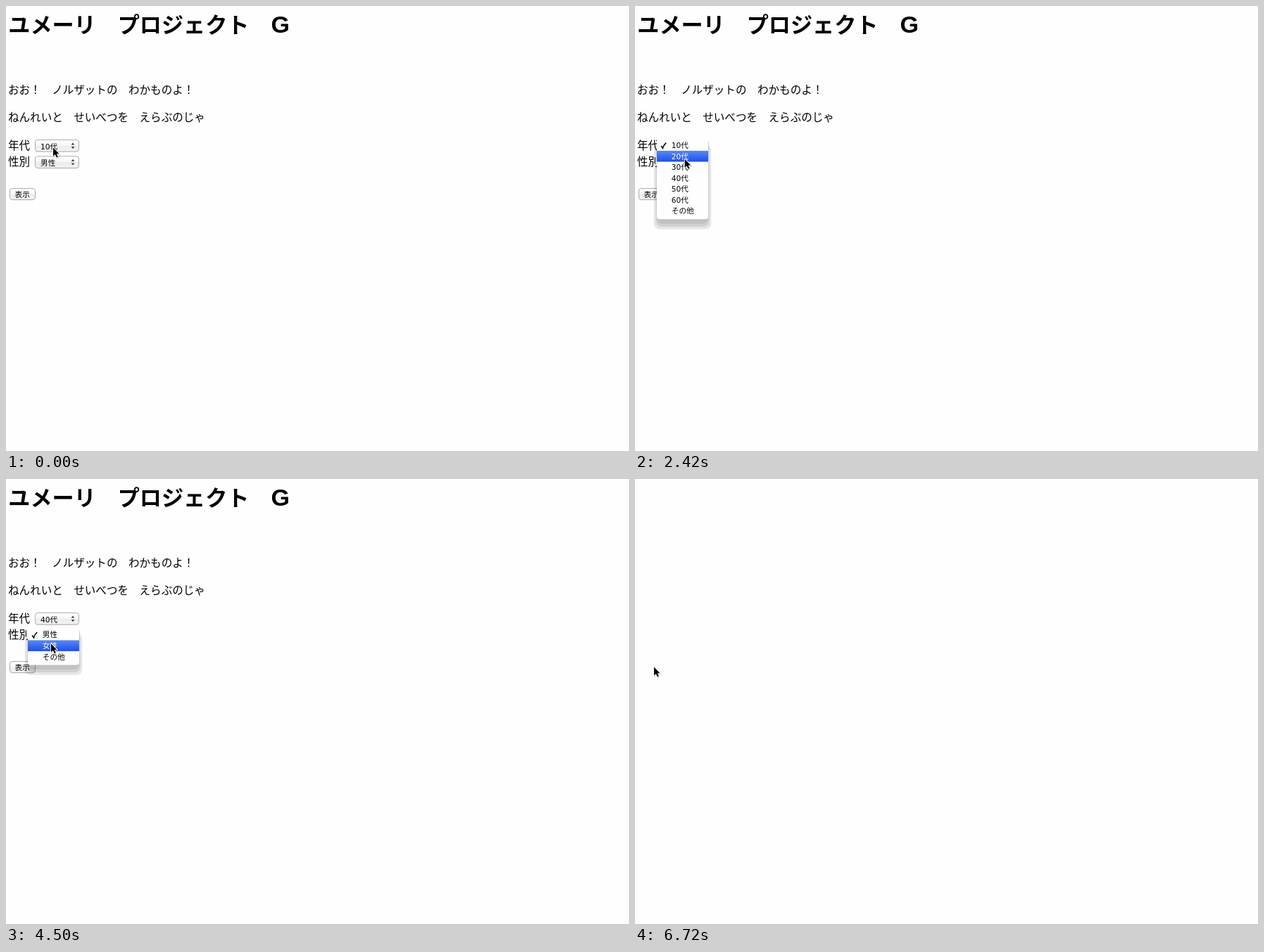
An HTML page that plays this animation: 885 by 633 pixels, repeating every 8 s.

```html
<!DOCTYPE html>
<html lang="ja">
<head>
<meta charset="utf-8">
<title>フォーム</title>
<style>
  html, body { margin: 0; width: 100%; height: 100%; overflow: hidden; background: #fefefe; }
  svg { display: block; width: 885px; height: 633px; }
  text { font-family: "Noto Sans CJK JP", "Noto Sans CJK", sans-serif; font-size: 15.56px; }
  .title { font-size: 31.1px; font-weight: 700; }
  .title tspan { font-family: "Liberation Sans", sans-serif; font-size: 34px; }
  .small { font-family: "DejaVu Sans", "Noto Sans CJK JP", "Noto Sans CJK", sans-serif; font-size: 10.65px; font-weight: 500; }
</style>
</head>
<body>
<svg viewBox="0 0 885 633">
  <defs>
    <linearGradient id="face" x2="0" y2="1">
      <stop offset="0" stop-color="#fff"/><stop offset=".5" stop-color="#f6f6f6"/>
      <stop offset=".52" stop-color="#ececec"/><stop offset="1" stop-color="#f3f3f3"/>
    </linearGradient>
    <linearGradient id="down" x2="0" y2="1">
      <stop offset="0" stop-color="#c9c9c9"/><stop offset="1" stop-color="#e4e4e4"/>
    </linearGradient>
    <linearGradient id="pick" x2="0" y2="1">
      <stop offset="0" stop-color="#5a87f6"/><stop offset="1" stop-color="#1a50ef"/>
    </linearGradient>
  </defs>
  <g id="page"></g>
  <g id="pointer">
    <path d="M0 0V12.2L2.8 9.6L4.9 14L6.8 13.2L4.9 8.8H8.5Z" transform="translate(.5 1.2)"
      fill="#000" opacity=".16" stroke="#000" stroke-width="1.6"/>
    <path d="M0 0V12.2L2.8 9.6L4.9 14L6.8 13.2L4.9 8.8H8.5Z"
      fill="#000" stroke="#fff" stroke-width="1.8" paint-order="stroke" stroke-linejoin="round"/>
  </g>
</svg>
<script>
const LOOP = 8000;
const ROW = 15.56;
const AGES = ['10代', '20代', '30代', '40代', '50代', '60代', 'その他'];
const SEXES = ['男性', '女性', 'その他'];
const page = document.getElementById('page');
const pointer = document.getElementById('pointer');

// [time, x, y] of the pointer tip
const moves = [
  [0, 67, 201.5], [2270, 68.5, 203.5], [2420, 70.7, 217.7], [2570, 72, 230.2],
  [2720, 73, 238.2], [2860, 73.7, 239.3], [3610, 69, 229.2], [3760, 64, 224.2],
  [4350, 63.5, 228.2], [4500, 64, 234.2], [5240, 60.5, 241.6], [5380, 53, 251.6],
  [5530, 39, 263], [5680, 28.5, 266.7], [5830, 27, 267.4]
];

// [time, changes to the form]
const events = [
  [0, { age: 0, sex: 0, focus: '', menu: '', pick: 0, pressed: false, blank: false }],
  [1050, { focus: 'age' }],
  [1830, { menu: 'age' }],
  [2420, { pick: 1 }],
  [2570, { pick: 2 }],
  [2720, { pick: 3 }],
  [3460, { menu: '' }],
  [3610, { age: 3 }],
  [4210, { menu: 'sex', focus: 'sex', pick: 0 }],
  [4500, { pick: 1 }],
  [5090, { menu: '' }],
  [5240, { sex: 1 }],
  [6420, { focus: '', pressed: true }],
  [6720, { blank: true }]
];

const text = (x, y, str, cls = '', fill = '#000') =>
  `<text x="${x}" y="${y}" class="${cls}" fill="${fill}">${str}</text>`;

const box = (x, y, w, h, r, attrs) =>
  `<rect x="${x}" y="${y}" width="${w}" height="${h}" rx="${r}" ${attrs}/>`;

function control(x, y, w, h, fill = 'face') {
  return box(x, y + 1, w, h, 3.5, 'fill="#000" opacity=".08"') +
    box(x, y, w, h, 3.5, `fill="url(#${fill})" stroke="#adadad"`);
}

function select(y, label, focused) {
  const ring = focused ? box(41.3, y, 62.4, 17, 3.5, 'fill="none" stroke="#8fb8e6" stroke-width="1.8"') : '';
  return control(41.5, y, 62, 16.6) + ring + text(49, y + 13.2, label, 'small') +
    `<path d="M92.6 ${y + 7.2}l2.4-3.2l2.4 3.2zM92.6 ${y + 9.6}l2.4 3.2l2.4-3.2z" fill="#444"/>`;
}

function menu(top, items, pick) {
  const h = items.length * ROW + 7.6;
  const y = top - 3.6;
  const bottom = y + h;
  const shadow = (pad, reach, alpha) => {
    const from = y + 14 - pad;
    return box(31 - pad, from, 73 + 2 * pad, bottom + reach - from, 8, `opacity="${alpha}"`);
  };
  let out = shadow(4.2, 14.3, .095) + shadow(1.5, 10.5, .09) + shadow(0, 6.5, .08);
  out += `<path d="M31 ${y + 4}q0-4 4-4h65q4 0 4 4V${bottom - 4}q0 4-4 4H35q-4 0-4-4z" fill="#fefefe"/>`;
  out += box(31, top + pick * ROW, 73, ROW, 0, 'fill="url(#pick)"');
  out += `<path d="M37.2 ${top + 8.6}l2.2 3.4q1.4-4.8 4.8-7.8" fill="none" stroke="${pick ? '#000' : '#fff'}" stroke-width="1.6"/>`;
  items.forEach((item, i) => {
    out += text(51.8, top + 11.6 + i * ROW, item, 'small', i === pick ? '#fff' : '#000');
  });
  return out;
}

function form(s) {
  if (s.blank) return '';
  return text(3.3, 38, 'ユメーリ　プロジェクト　<tspan>G</tspan>', 'title') +
    text(3, 125.3, 'おお！　ノルザットの　わかものよ！') +
    text(3, 164.4, 'ねんれいと　せいべつを　えらぶのじゃ') +
    text(3, 203.6, '年代') + text(3, 227.2, '性別') +
    select(190.4, AGES[s.age], s.focus === 'age') +
    select(213.8, SEXES[s.sex], s.focus === 'sex') +
    control(5.5, 259.5, 36, 16, s.pressed ? 'down' : 'face') +
    text(12.6, 272, '表示', 'small') +
    (s.menu === 'age' ? menu(190.4, AGES, s.pick) : '') +
    (s.menu === 'sex' ? menu(213.8, SEXES, s.pick) : '');
}

let shown = '';
function draw(t) {
  const state = Object.assign({}, ...events.filter(e => e[0] <= t).map(e => e[1]));
  const key = JSON.stringify(state);
  if (key !== shown) {
    page.innerHTML = form(state);
    shown = key;
  }
  const [, x, y] = moves.filter(m => m[0] <= t).pop();
  pointer.setAttribute('transform', `translate(${x} ${y})`);
}

const start = performance.now();
function tick() {
  draw((performance.now() - start) % LOOP);
  requestAnimationFrame(tick);
}
tick();
</script>
</body>
</html>
```
